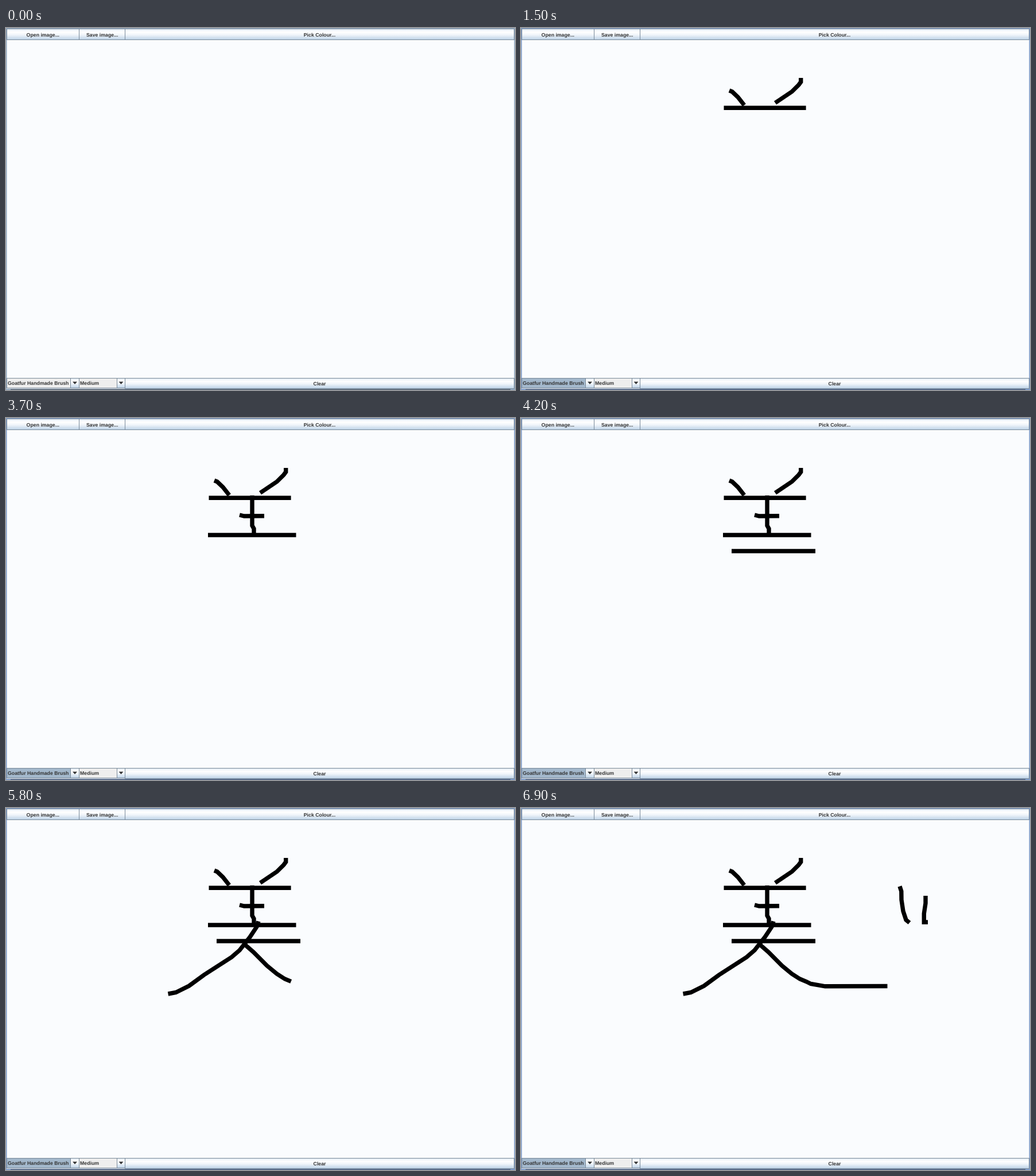
An HTML page with a canvas for the animation above (8000 ms loop, 887 by 631 pixels).

```html
<!DOCTYPE html>
<html lang="en">
<head>
<meta charset="utf-8">
<title>Brush strokes</title>
<style>
  html, body { margin: 0; width: 100%; height: 100%; overflow: hidden; background: #fafcfe; }
  canvas { display: block; }
</style>
</head>
<body>
<canvas id="stage" width="887" height="631"></canvas>
<script>
const ctx = document.getElementById('stage').getContext('2d');
const W = 887, H = 631, LOOP = 8000, STEP = 100;
const EDGE = '#7a8a99';

// start: ms of the first step; parts: drawn share of the path after each step
const strokes = [
  { start: 400, parts: [1], path: [363,109, 368,111, 378,120.5, 389,134.5] },
  { start: 1000, parts: [1], path: [443,130.5, 472,111, 484,99, 487.7,94, 487.7,87] },
  { start: 1400, parts: [.6, 1], path: [353.5,139.2, 496.6,139.2] },
  { start: 2400, parts: [1], path: [407,169, 415,171, 450,170.8] },
  { start: 2900, parts: [1], path: [352,204, 505.5,204] },
  { start: 3600, parts: [.7, 1], path: [429,135, 429,187.5, 432,193, 432,203] },
  { start: 4200, parts: [1], path: [367,232, 513,232] },
  { start: 4900, parts: [.3, .75, 1],
    path: [440,197.5, 437,207, 425,225, 407,248, 393,260, 345,291, 319,310, 296,321.5, 282.5,324] },
  { start: 5800, parts: [.424, .75, 1],
    path: [415,237, 431,251, 455,275, 472,289, 486,298, 497,302.5, 505,306.5, 530,310.8, 638.5,310.5] },
  { start: 6500, parts: [.6, 1], path: [660,136.5, 662.8,145, 663,160, 666,180, 671,195, 677,200] },
  { start: 6800, parts: [.7, 1], path: [705,153, 705,166, 702.3,184, 702.3,199, 709,199] }
];

function rect(x, y, w, h, color) {
  ctx.fillStyle = color;
  ctx.fillRect(x, y, w, h);
}

function label(text, x, y, align) {
  ctx.font = 'bold 8.75px "Liberation Sans", Arial, sans-serif';
  ctx.textRendering = 'geometricPrecision';
  ctx.textAlign = align;
  ctx.textBaseline = 'alphabetic';
  ctx.fillStyle = '#333';
  ctx.fillText(text, x, y);
}

function button(x, y, w, h) {
  const g = ctx.createLinearGradient(0, y, 0, y + h);
  g.addColorStop(0, '#dde8f3');
  g.addColorStop(.3, '#fff');
  g.addColorStop(.55, '#f0f5fa');
  g.addColorStop(1, '#b8cfe5');
  rect(x, y, w, h, EDGE);
  rect(x + 1, y + 1, w - 2, h - 2, g);
}

function combo(x, w, text, arrowX, selected) {
  rect(x, 610, w, 18, EDGE);
  rect(x + 1, 611, w - 2, 16, selected ? '#a3b8cc' : '#eee');
  button(arrowX, 610, x + w - arrowX, 18);
  label(text, x + 2, 622, 'left');
  const mid = (arrowX + x + w) / 2;
  ctx.fillStyle = '#333';
  ctx.beginPath();
  ctx.moveTo(mid - 4, 616.5);
  ctx.lineTo(mid + 4, 616.5);
  ctx.lineTo(mid, 621);
  ctx.fill();
}

function drawWindow(active) {
  rect(0, 0, W, H, active ? '#7f9cc9' : '#93a9c1');
  rect(1.5, 1, W - 3, 628, '#fafcfe');
  button(1, 1, 127, 20);
  button(127, 1, 81, 20);
  button(207, 1, 679, 20);
  label('Open image...', 64.3, 15, 'center');
  label('Save image...', 167.7, 15, 'center');
  label('Pick Colour...', 546.5, 15, 'center');
  combo(1, 127, 'Goatfur Handmade Brush', 112, active);
  combo(127, 81, 'Medium', 193, false);
  button(207, 610, 679, 19);
  label('Clear', 546.5, 623, 'center');
  rect(1, 628, 206, 1, '#e4e9ef');
  rect(8, 629.5, 871, 1.5, active ? '#53627a' : '#59636e');
}

function drawStroke({ start, parts, path }, t) {
  if (t < start) return;
  const step = Math.min(parts.length - 1, Math.floor((t - start) / STEP));
  let length = 0;
  ctx.beginPath();
  ctx.moveTo(path[0], path[1]);
  for (let i = 2; i < path.length; i += 2) {
    ctx.lineTo(path[i], path[i + 1]);
    length += Math.hypot(path[i] - path[i - 2], path[i + 1] - path[i - 1]);
  }
  ctx.setLineDash(parts[step] < 1 ? [length * parts[step], length] : []);
  ctx.stroke();
}

function frame(now) {
  const t = now % LOOP;
  drawWindow(t >= strokes[0].start);
  ctx.strokeStyle = '#000';
  ctx.lineWidth = 7.4;
  ctx.lineJoin = 'miter';
  strokes.forEach(s => drawStroke(s, t));
  ctx.setLineDash([]);
}

const begin = performance.now();
function tick() {
  frame(performance.now() - begin);
  requestAnimationFrame(tick);
}
tick();
</script>
</body>
</html>
```
